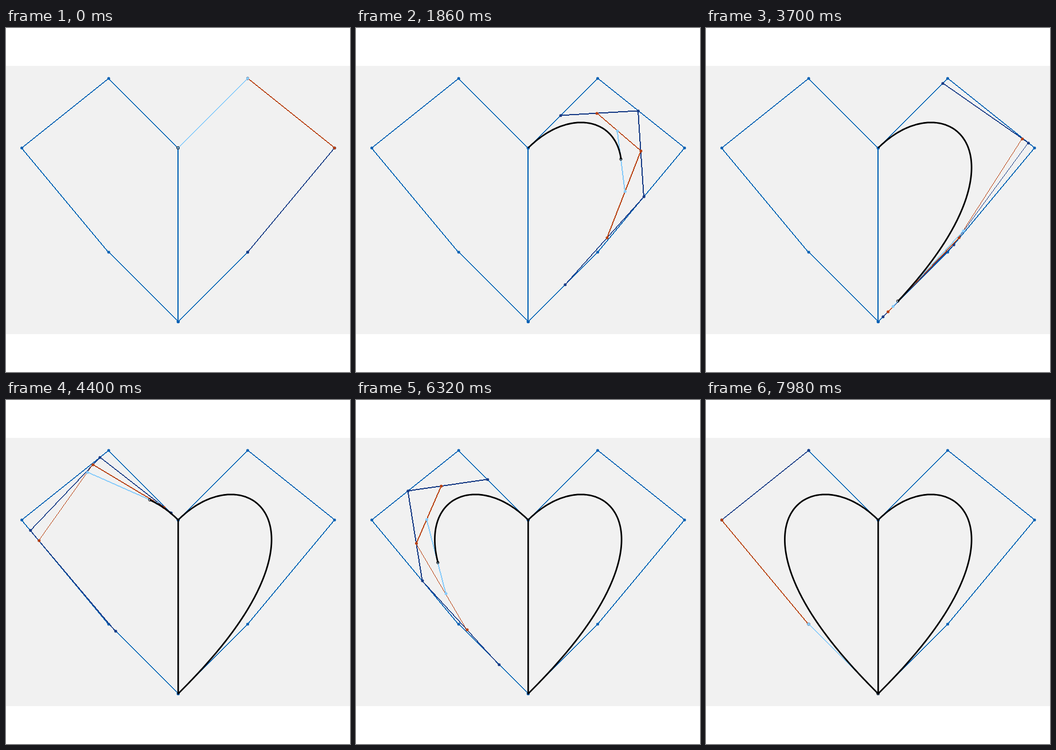
Recreate the animation shown at these times as an HTML page with a canvas. Size 600 px wide and 600 px high, loop 8 s.

```html
<!DOCTYPE html>
<html>
<head>
<meta charset="utf-8">
<title>Bezier heart</title>
<style>
html, body { margin: 0; width: 100%; height: 100%; overflow: hidden; background: #fff; }
canvas { display: block; }
</style>
</head>
<body>
<canvas id="stage" width="600" height="600"></canvas>
<script>
const ctx = document.getElementById('stage').getContext('2d');
const UNIT = 30.3, CX = 300, CY = 209;
const STEPS = 200, STEP_MS = 20;
const BLUE = '#0060b4', DARK = '#183c86', ORANGE = '#b84010', LIGHT = '#87cbfa';

const half = side => [[0, 0], [4, -4], [9, 0], [4, 6], [0, 10]]
  .map(([x, y]) => [CX + side * x * UNIT, CY + y * UNIT]);
const right = half(1), left = half(-1);

const mix = (a, b, t) => [a[0] + (b[0] - a[0]) * t, a[1] + (b[1] - a[1]) * t];
const reduce = (pts, t) => pts.slice(1).map((p, i) => mix(pts[i], p, t));

function pointAt(pts, t) {
  while (pts.length > 1) pts = reduce(pts, t);
  return pts[0];
}

const trace = pts => Array.from({ length: STEPS }, (_, i) => pointAt(pts, i / (STEPS - 1)));
const path = [...trace(right), ...trace(left)];

// Hard-edged line; middle-steep slopes come out one pixel wide.
function line(a, b) {
  const dx = b[0] - a[0], dy = b[1] - a[1];
  const steep = Math.abs(dy) > Math.abs(dx);
  const k = steep ? 1 : 0;
  if (a[k] > b[k]) [a, b] = [b, a];
  const slope = Math.abs(dy / dx);
  const w = slope > 1.28 && slope < 2.28 ? 1 : 2;
  const from = Math.round(a[k]), to = Math.round(b[k]);
  const span = b[k] - a[k] || 1;
  for (let p = from; p <= to; p++) {
    const t = Math.min(1, Math.max(0, (p - a[k]) / span));
    const q = Math.round(a[1 - k] + (b[1 - k] - a[1 - k]) * t) - w + 1;
    if (steep) ctx.fillRect(q - (w > 1 ? 0 : 1), p, w, 1);
    else ctx.fillRect(p, q - (w > 1 ? 0 : 1), 1, w);
  }
}

function circle([x, y], r) {
  ctx.beginPath();
  ctx.arc(x, y, r, 0, Math.PI * 2);
}

function polyline(pts, color) {
  ctx.fillStyle = color;
  for (let i = 1; i < pts.length; i++) line(pts[i - 1], pts[i]);
  for (const [x, y] of pts) {
    circle([x + 0.3, y + 0.3], 2.5);
    ctx.fill();
  }
}

function draw(step) {
  const first = step < STEPS;
  const t = (step % STEPS) / (STEPS - 1);

  ctx.fillStyle = '#fff';
  ctx.fillRect(0, 0, 600, 600);
  ctx.fillStyle = '#f1f1f1';
  ctx.fillRect(0, 66, 600, 468);

  polyline(right, BLUE);
  polyline([right[4], left[0]], BLUE);
  polyline(left, BLUE);

  let pts = first ? right : left;
  for (const color of [DARK, ORANGE, LIGHT]) {
    pts = reduce(pts, t);
    polyline(pts, color);
  }

  ctx.strokeStyle = '#000';
  ctx.lineWidth = 2.7;
  ctx.lineJoin = 'round';
  ctx.beginPath();
  for (let i = 0; i <= step; i++) ctx.lineTo(path[i][0] + 0.3, path[i][1] + 0.3);
  if (step) ctx.stroke();

  ctx.lineWidth = 1;
  circle(path[step], 2.2);
  ctx.stroke();
}

function tick() {
  draw(Math.floor(performance.now() / STEP_MS) % (2 * STEPS));
  requestAnimationFrame(tick);
}
tick();
</script>
</body>
</html>
```
